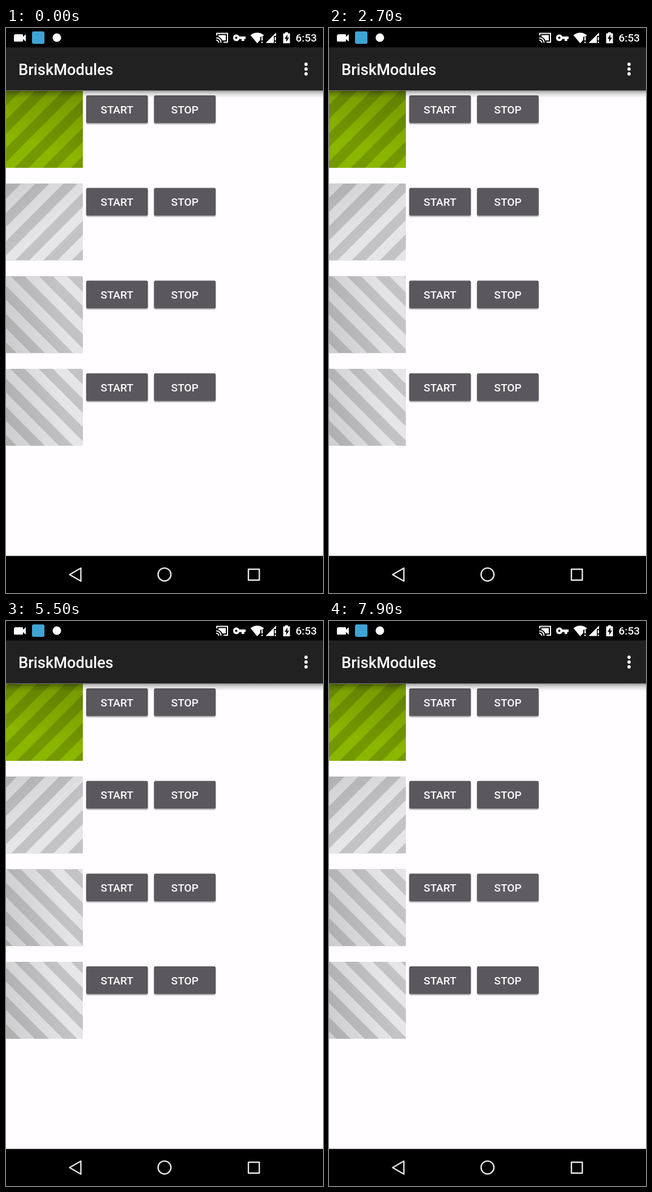
These frames come from a looping animation (561 by 998 pixels, 8 s). An HTML page:

```html
<!DOCTYPE html>
<html lang="en">
<head>
<meta charset="utf-8">
<title>Scrolling stripes</title>
<style>
  html, body { margin: 0; width: 100%; height: 100%; overflow: hidden; background: #fffdff; }
  svg { display: block; width: 561px; height: 998px; }
  text { font-family: Roboto, "Noto Sans", sans-serif; font-weight: 500; fill: #fff; }
  .label { font-size: 19.1px; text-anchor: middle; }
</style>
</head>
<body>
<svg viewBox="0 0 561 998">
  <defs>
    <clipPath id="tileClip"><rect width="136" height="136"/></clipPath>
    <linearGradient id="barShadow" x2="0" y2="1">
      <stop offset="0" stop-color="#000" stop-opacity=".38"/>
      <stop offset=".4" stop-color="#000" stop-opacity=".16"/>
      <stop offset="1" stop-color="#000" stop-opacity="0"/>
    </linearGradient>
    <linearGradient id="greenShade" x1=".7" y1="0" x2=".4" y2="1">
      <stop offset="0" stop-color="#000" stop-opacity=".16"/>
      <stop offset=".75" stop-color="#000" stop-opacity="0"/>
    </linearGradient>
    <linearGradient id="grayDown" x1="0" y1="0" x2=".6" y2="1">
      <stop offset="0" stop-color="#000" stop-opacity=".1"/>
      <stop offset=".7" stop-color="#000" stop-opacity="0"/>
    </linearGradient>
    <linearGradient id="graySide" x1="0" y1=".6" x2="1" y2=".4">
      <stop offset="0" stop-color="#000" stop-opacity=".1"/>
      <stop offset=".75" stop-color="#000" stop-opacity="0"/>
    </linearGradient>
    <filter id="drop" x="-10%" y="-10%" width="120%" height="130%">
      <feDropShadow dx="0" dy="1.6" stdDeviation="1.2" flood-opacity=".45"/>
    </filter>
  </defs>

  <rect width="561" height="998" fill="#fffdff"/>
  <g id="rows"></g>

  <rect y="110.5" width="561" height="13" fill="url(#barShadow)"/>
  <rect y="34" width="561" height="76.5" fill="#212121"/>
  <text x="22" y="83" font-size="27.3">BriskModules</text>
  <g fill="#fff">
    <circle cx="531" cy="64" r="2.9"/>
    <circle cx="531" cy="72.5" r="2.9"/>
    <circle cx="531" cy="81" r="2.9"/>
  </g>

  <!-- Status bar -->
  <rect width="561" height="34.2"/>
  <g fill="#fff">
    <path d="M15.5 11h13q1.5 0 1.5 1.5v3l5-4.5v13l-5-4.5v3q0 1.5-1.5 1.5h-13q-1.5 0-1.5-1.5v-9q0-1.5 1.5-1.5z"/>
    <circle cx="90" cy="17" r="7.5"/>
    <path d="M402 17a5.6 5.6 0 0 1 10.8-2H424v4.5h-2.5V23h-4.5v-3.5h-4.2A5.6 5.6 0 0 1 402 17z"/>
    <circle cx="407.5" cy="17.2" r="2" fill="#000"/>
    <path d="M432.5 12.5Q444.5 4 456.5 12.5L454 15.5H450V21L444.5 27z"/>
    <path d="M452 16h2.3v6h-2.3zM452 24h2.3v2.5h-2.3z"/>
    <path d="M459.5 26.5L478 8v6h-4v12.5z"/>
    <path d="M475.5 16h2.3v6h-2.3zM475.5 24h2.3v2.5h-2.3z"/>
    <path d="M494 9.5V7.5h5v2h3.5v17.5h-12V9.5z"/>
    <path d="M498 11.5l-5 7.5h3v5.5l5-7.5h-3z" fill="#000"/>
  </g>
  <rect x="46" y="6" width="22" height="22" rx="3" fill="#3fa3d4"/>
  <g fill="none" stroke="#fff" stroke-width="2">
    <path d="M373 13V9.5h19V25h-7"/>
    <path d="M372 17.5a8 8 0 0 1 8.5 8.5M372 21.5a4.5 4.5 0 0 1 4.5 4.5"/>
  </g>
  <path d="M376 12.5h13v9.5h-6q-2-5-7-6.5z" fill="#fff"/>
  <text x="512.5" y="24" font-size="19.1">6:53</text>

  <!-- Navigation bar -->
  <rect y="932.5" width="561" height="66"/>
  <g fill="none" stroke="#e8e8e8" stroke-width="2.4" stroke-linejoin="round">
    <path d="M112.5 965.500L132.500 954V977z"/>
    <circle cx="280.500" cy="965.300" r="11.400"/>
    <rect x="429" y="956" width="19.300" height="19.300"/>
  </g>
</svg>
<script>
const LOOP = 8000, STEP = 100;
const PERIOD = 50, SPEED = 46.75; // px and px per second
const NS = "http://www.w3.org/2000/svg";

// lean: 1 for "/" stripes, -1 for "\" stripes
const rows = [
  { y: 111, lean: 1, start: 26, dir: -1, press: 3900, stop: 4200,
    dark: "#749800", light: "#8bb600", shade: "greenShade" },
  { y: 274.5, lean: 1, start: 27, dir: -1, press: 6200, stop: 6400,
    dark: "#c3c2c4", light: "#e6e5e7", shade: "grayDown" },
  { y: 438.2, lean: -1, start: 33, dir: -1, press: 7800, stop: LOOP,
    dark: "#c3c2c4", light: "#e4e3e5", shade: "graySide" },
  { y: 602, lean: -1, start: 33, dir: 1, press: LOOP, stop: LOOP,
    dark: "#c3c2c4", light: "#e6e5e7", shade: "graySide" }
];

function add(parent, tag, attrs, text) {
  const el = document.createElementNS(NS, tag);
  for (const key in attrs) el.setAttribute(key, attrs[key]);
  if (text) el.textContent = text;
  return parent.appendChild(el);
}

function stripePath(lean) {
  let d = "";
  for (let x = -200; x <= 350; x += PERIOD) {
    d += `M${x} 0h${PERIOD / 2}l${-lean * 137} 137h${-PERIOD / 2}z`;
  }
  return d;
}

function addButton(parent, x, label) {
  const box = { x, y: 8, width: 109, height: 48.8, rx: 2.5 };
  add(parent, "rect", { ...box, fill: "#5a585b", filter: "url(#drop)" });
  const glow = add(parent, "g", { opacity: 0, fill: "#fff", "fill-opacity": .7 });
  add(glow, "rect", box);
  const ripple = add(glow, "circle", { cx: 340, cy: 31, r: 0 });
  add(parent, "text", { x: x + 54.5, y: 39.8, class: "label" }, label);
  return { glow, ripple };
}

for (const row of rows) {
  const g = add(document.getElementById("rows"), "g", { transform: `translate(0 ${row.y})` });
  const tile = add(g, "g", { "clip-path": "url(#tileClip)" });
  const full = { width: 137, height: 137 };
  add(tile, "rect", { ...full, fill: row.dark });
  row.stripes = add(tile, "path", { d: stripePath(row.lean), fill: row.light });
  add(tile, "rect", { ...full, fill: `url(#${row.shade})` });
  addButton(g, 142, "START");
  row.button = addButton(g, 262, "STOP");
}

function glowAt(age) {
  if (age < 0 || age >= 900) return 0;
  return 0.18 * Math.min(1, age / 400, (900 - age) / 400);
}

function draw(now) {
  const t = Math.floor((now % LOOP) / STEP) * STEP;
  for (const row of rows) {
    const moved = row.dir * SPEED * Math.min(t, row.stop) / 1000;
    const phase = ((row.start + moved) % PERIOD + PERIOD) % PERIOD;
    row.stripes.setAttribute("transform", `translate(${phase} 0)`);
    const age = t - row.press;
    row.button.glow.setAttribute("opacity", glowAt(age));
    row.button.ripple.setAttribute("r", Math.max(0, Math.min(16, age / 18)));
  }
}

const begin = performance.now();
function tick() {
  draw(performance.now() - begin);
  requestAnimationFrame(tick);
}
tick();
</script>
</body>
</html>
```
